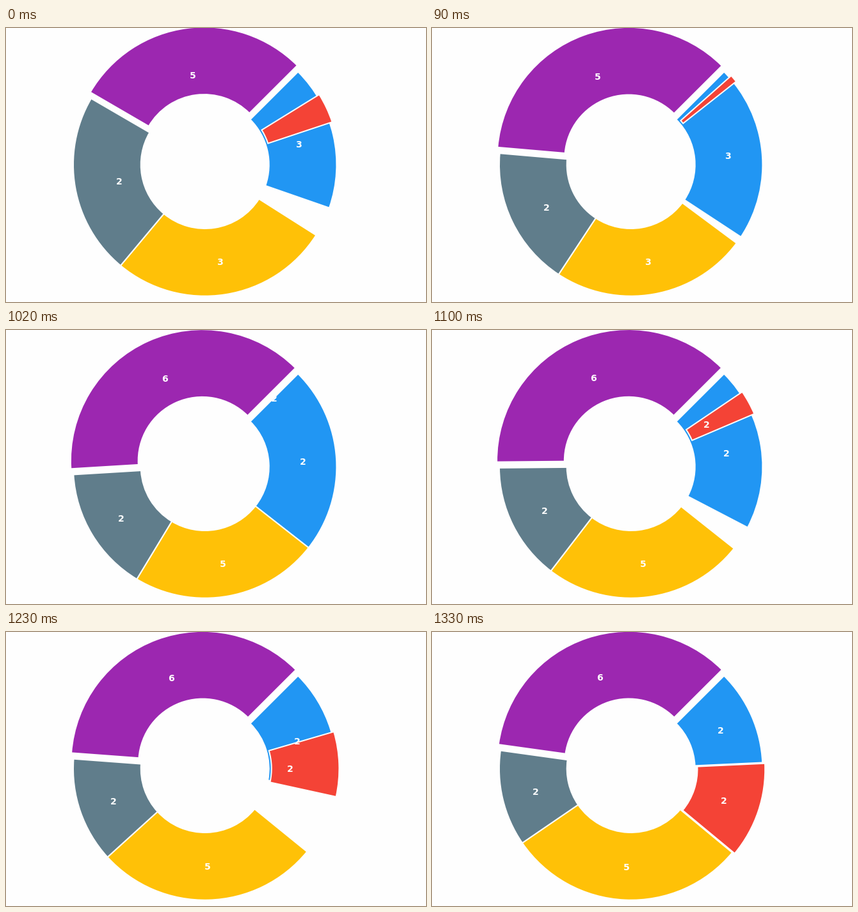
Write a matplotlib script that moves like this. It is 656x429 px and loops after 2.3 s.

```python
import numpy as np
import matplotlib.pyplot as plt
from matplotlib.animation import FuncAnimation
from matplotlib.patches import Wedge

W, H, DPI = 656, 429, 100
PX = 72 / DPI
LOOP, STEP = 2300, 10
CENTER = np.array([310.7, 214])
OUTER, INNER = 205.7, 100
PAPER = "#fefefe"

# Slices run clockwise: blue, red, amber, slate, purple
COLORS = ["#2196f3", "#f44336", "#ffc107", "#607d8b", "#9c27b0"]
PUSH = [0, 4, 0, 0, 10]
DATA = [[2, 2, 7, 7, 3], [3, 0, 3, 2, 5], [2, 2, 5, 2, 6]]

# The first change is already under way when the loop begins
STARTS = [-190, 1020]
DURATION = 310
TICKS = [0, 30, 90, 140, 1020, 1100, 1160, 1190, 1230, 1260, 1290, 1330]


def polar(radius, degrees):
    """Offset at an angle measured clockwise from the top."""
    a = np.radians(degrees)
    return radius * np.array([np.sin(a), -np.cos(a)])


def layout(values):
    """Start angle, sweep and label position of every slice."""
    sweep = 360 * np.array(values) / sum(values)
    start = 45 + np.cumsum(sweep) - sweep
    # An empty slice folds back to the beginning of the ring
    start[sweep == 0] = 45
    labels = CENTER + polar((OUTER + INNER) / 2, start + sweep / 2).T
    return np.column_stack([start, sweep, labels])


LAYOUTS = [layout(v) for v in DATA]

fig = plt.figure(figsize=(W / DPI, H / DPI), dpi=DPI, facecolor=PAPER)
ax = fig.add_axes([0, 0, 1, 1])
ax.set_xlim(0, W)
ax.set_ylim(H, 0)
ax.axis("off")

wedges = [
    ax.add_patch(Wedge(CENTER, OUTER, 0, 90, width=OUTER - INNER, fc=color,
                       ec=PAPER, lw=2 * PX, joinstyle="miter", zorder=2 + i))
    for i, color in enumerate(COLORS)
]
texts = [
    ax.text(0, 0, "", color="white", family="DejaVu Sans", weight="bold",
            size=14 * PX, ha="center", va="baseline", zorder=10)
    for _ in COLORS
]


def draw(frame):
    ms = max(t for t in TICKS if t <= frame * STEP)
    stage = int(ms >= STARTS[1])
    p = min(1, (ms - STARTS[stage]) / DURATION)
    before, after = LAYOUTS[stage:stage + 2]
    pose = before + (after - before) * p

    rows = zip(wedges, texts, PUSH, DATA[stage + 1], pose)
    for wedge, text, push, value, (start, sweep, x, y) in rows:
        wedge.set_center(CENTER + polar(push, start + sweep / 2))
        wedge.set_theta1(start - 90)
        wedge.set_theta2(start + sweep - 90)
        wedge.set_visible(sweep > 0.1)
        text.set_text(str(value) if value else "")
        text.set_position((x, y + 6.5))
    return wedges + texts


anim = FuncAnimation(fig, draw, frames=LOOP // STEP, interval=STEP,
                     init_func=lambda: draw(0), repeat=True, repeat_delay=0,
                     blit=False)
plt.show()
```
